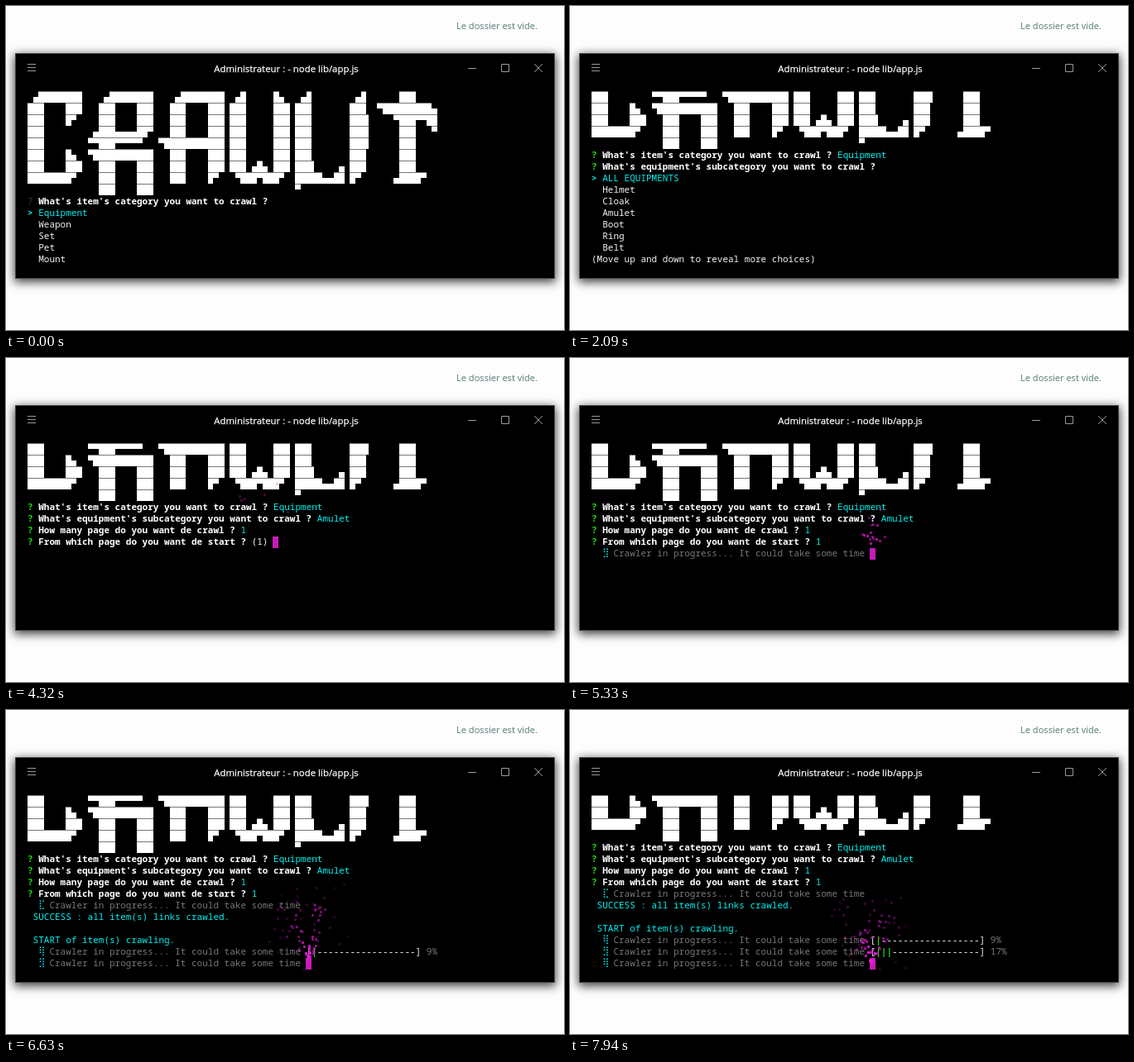
An HTML page with a canvas for the animation above (8000 ms loop, 674 by 392 pixels).

```html
<!DOCTYPE html>
<html lang="fr">
<head>
<meta charset="utf-8">
<title>Terminal</title>
<style>
html, body { margin: 0; width: 100%; height: 100%; overflow: hidden; background: #fdfdfd; }
body { position: relative; font-family: "Open Sans", "Noto Sans", sans-serif; }
.note { position: absolute; left: 544px; top: 16px; font-size: 11.1px; line-height: 16px; color: #557d78; white-space: pre; }
.win { position: absolute; left: 11px; top: 57px; width: 650px; height: 271px; background: #000; border: 1px solid #444;
  box-shadow: 0 3px 11px 1px rgba(0, 0, 0, .75); }
.title { position: absolute; left: 11px; top: 68px; width: 655px; text-align: center; font-size: 11.43px; line-height: 16px;
  color: #fff; -webkit-text-stroke: .25px #fff; white-space: pre; }
svg, canvas { position: absolute; left: 0; top: 0; }
#term { position: absolute; left: 26px; top: 103px; margin: 0; color: #f4f4f4;
  font: 500 11px/14px "Noto Sans Mono", "DejaVu Sans Mono", monospace; white-space: pre; }
#term div { height: 14px; }
#term b { color: #fff; font-weight: 700; }
#term .c { color: #00f0f0; }
#term .g { color: #18dc0a; font-weight: 700; }
#term .d { color: #2a4a14; }
#term .m { color: #767676; font-weight: 400; }
#term .s { display: inline-block; width: 6.6px; height: 14px; vertical-align: top; color: #00e4ea;
  font: 11px/14px "DejaVu Sans", sans-serif; }
#cursor { position: absolute; width: 7px; height: 14px; background: #c71cb8; }
</style>
</head>
<body>
<div class="note">Le dossier est vide.</div>
<div class="win"></div>
<div class="title">Administrateur : - node lib/app.js</div>
<svg width="674" height="392" fill="none" stroke="#999">
  <path d="M26 70.5h10M26 74.5h10M26 78.5h10M558 75.5h10M598.5 70.5h9v9h-9zM638 70l10 10M648 70l-10 10"/>
</svg>
<div id="term"></div>
<div id="cursor"></div>
<canvas id="fx" width="674" height="392"></canvas>
<script>
const LOOP = 8000, CELL = 6.6, ROW = 14, LEFT = 26, TOP = 103;
const term = document.getElementById('term');
const cursor = document.getElementById('cursor');
const ctx = document.getElementById('fx').getContext('2d');

const ART = [
  ' ▄████████    ▄████████    ▄████████  ▄█     █▄   ▄█        ▄█      ███',
  '███    ███   ███    ███   ███    ███ ███     ███ ███       ███  ▀█████████▄',
  '███    █▀    ███    ███   ███    ███ ███     ███ ███       ███▌    ▀███▀▀██',
  '███         ▄███▄▄▄▄██▀   ███    ███ ███     ███ ███       ███▌     ███   ▀',
  '███        ▀▀███▀▀▀▀▀   ▀███████████ ███     ███ ███       ███▌     ███',
  '███    █▄  ▀███████████   ███    ███ ███     ███ ███       ███      ███',
  '███    ███   ███    ███   ███    ███ ███ ▄█▄ ███ ███▌    ▄ ███      ███',
  '████████▀    ███    ███   ███    █▀   ▀███▀███▀  █████▄▄██ █▀      ▄████▀',
  '             ███    ███                          ▀'
];

const tag = (cls, s) => `<span class="${cls}">${s}</span>`;
const ask = (q, a = '', mark = 'g') => `${tag(mark, '?')} <b>${q}</b> ${a}`;
const cyan = s => tag('c', s);
const menu = (items, sel) => items.map((s, i) => i === sel ? cyan(`<b class="c">&gt;</b> ${s}`) : '  ' + s);
const SPIN = '⣾⣽⣻⢿⡿⣟⣯⣷';
const work = (glyph, rest = '') =>
  `  ${tag('s', glyph)} ${tag('m', 'Crawler in progress... It could take some time')} ${rest}`;
const bar = (n, pct) => `[${tag('g', '|'.repeat(n))}${'-'.repeat(19 - n)}] ${tag('m', pct + '%')}`;

const Q1 = "What's item's category you want to crawl ?";
const Q2 = "What's equipment's subcategory you want to crawl ?";
const Q3 = 'How many page do you want de crawl ?';
const Q4 = 'From which page do you want de start ?';
const KINDS = ['Equipment', 'Weapon', 'Set', 'Pet', 'Mount'];
const PARTS = ['ALL EQUIPMENTS', 'Helmet', 'Cloak', 'Amulet', 'Boot', 'Ring', 'Belt'];

// Moments at which the dialogue moves on
const T = { parts: 2090, pages: 2930, start: 3790, links: 4950, items: 5600, bar1: 6400, bar2: 7100 };
const MOVES = [2330, 2490, 2690];

function screen(t) {
  if (t < T.parts) return { scroll: 0, lines: [ask(Q1, '', 'd'), ...menu(KINDS, 0)] };
  const lines = [ask(Q1, cyan('Equipment'))];
  if (t < T.pages) {
    const sel = MOVES.filter(m => t >= m).length;
    lines.push(ask(Q2), ...menu(PARTS, sel), '(Move up and down to reveal more choices)');
    return { scroll: 4, lines };
  }
  lines.push(ask(Q2, cyan('Amulet')));
  if (t < T.start) return { scroll: 4, lines: [...lines, ask(Q3, '(1)')], col: 43 };
  lines.push(ask(Q3, cyan('1')));
  if (t < T.links) return { scroll: 4, lines: [...lines, ask(Q4, '(1)')], col: 45 };
  lines.push(ask(Q4, cyan('1')));
  const live = work(SPIN[Math.floor(t / 80) % 8]);
  if (t >= T.items) {
    lines.push(work('⣏'), cyan(' SUCCESS : all item(s) links crawled.'), '', cyan(' START of item(s) crawling.'));
    if (t >= T.bar1) lines.push(work('⢿', bar(1, 9)));
    if (t >= T.bar2) lines.push(work('⣻', bar(3, 17)));
  }
  lines.push(live);
  return { scroll: t < T.bar2 ? 4 : 5, lines, col: 51 };
}

function drawArt(scroll) {
  ART.slice(scroll).forEach((line, r) => {
    const y = TOP + r * ROW;
    [...line].forEach((ch, c) => {
      if (ch === ' ') return;
      const x = Math.round(LEFT + c * CELL);
      const w = ch === '▌' ? 3 : Math.round(LEFT + (c + 1) * CELL) - x;
      if (ch !== '▄') {
        ctx.fillStyle = '#777';
        ctx.fillRect(x, y, w, 1);
      }
      ctx.fillStyle = '#fff';
      if (ch === '▄') ctx.fillRect(x, y + 7, w, 7);
      else ctx.fillRect(x, y + 1, w, ch === '▀' ? 6 : 13);
    });
  });
}

function rng(seed) {
  return () => {
    seed = (seed + 0x6D2B79F5) | 0;
    let v = Math.imul(seed ^ (seed >>> 15), 1 | seed);
    v = (v + Math.imul(v ^ (v >>> 7), 61 | v)) ^ v;
    return ((v ^ (v >>> 14)) >>> 0) / 4294967296;
  };
}

// Bursts: [time, x, y, count]
const bursts = [
  [310, 71, 306, 8], [1050, 71, 306, 7], [2510, 293, 306, 8],
  [2930, 295, 306, 7], [3010, 310, 216, 5], [3790, 310, 208, 6],
  [5600, 26, 286, 7], [6740, 358, 142, 5]
];
const stream = (from, to, y, n) => {
  for (let t = from; t < to; t += 80) bursts.push([t, 362, y, n]);
};
stream(T.links, 5270, 236, 4);
stream(5620, T.bar1, 292, 7);
stream(T.bar1, 6720, 306, 7);
stream(7120, LOOP, 306, 7);

const dots = bursts.flatMap(([t0, x, y, n], i) => {
  const rand = rng(i * 97 + 11);
  return Array.from({ length: n }, () => ({ t0, x, y, vx: rand() * 2 - 1, vy: -3.5 + rand() * 2 }));
});

function drawDots(t) {
  ctx.save();
  ctx.beginPath();
  ctx.rect(11, 57, 652, 273);
  ctx.clip();
  ctx.fillStyle = 'rgb(235,28,220)';
  for (const p of dots) {
    const k = (t - p.t0) * .06;
    if (k < 0 || k > 56) continue;
    ctx.globalAlpha = Math.pow(.96, k);
    ctx.fillRect(Math.round(p.x + p.vx * k), Math.round(p.y + p.vy * k + .0375 * k * k), 3, 3);
  }
  ctx.restore();
}

let shown = '';
function draw() {
  const t = performance.now() % LOOP;
  const { scroll, lines, col } = screen(t);
  const first = ART.length - scroll;
  const html = '<div></div>'.repeat(first) + lines.map(s => `<div>${s}</div>`).join('');
  if (html !== shown) term.innerHTML = shown = html;
  cursor.hidden = col === undefined;
  if (col !== undefined) {
    cursor.style.left = Math.round(LEFT + col * CELL - .6) + 'px';
    cursor.style.top = TOP + 1 + (first + lines.length - 1) * ROW + 'px';
  }
  ctx.clearRect(0, 0, 674, 392);
  drawArt(scroll);
  drawDots(t);
  requestAnimationFrame(draw);
}
draw();
</script>
</body>
</html>
```
